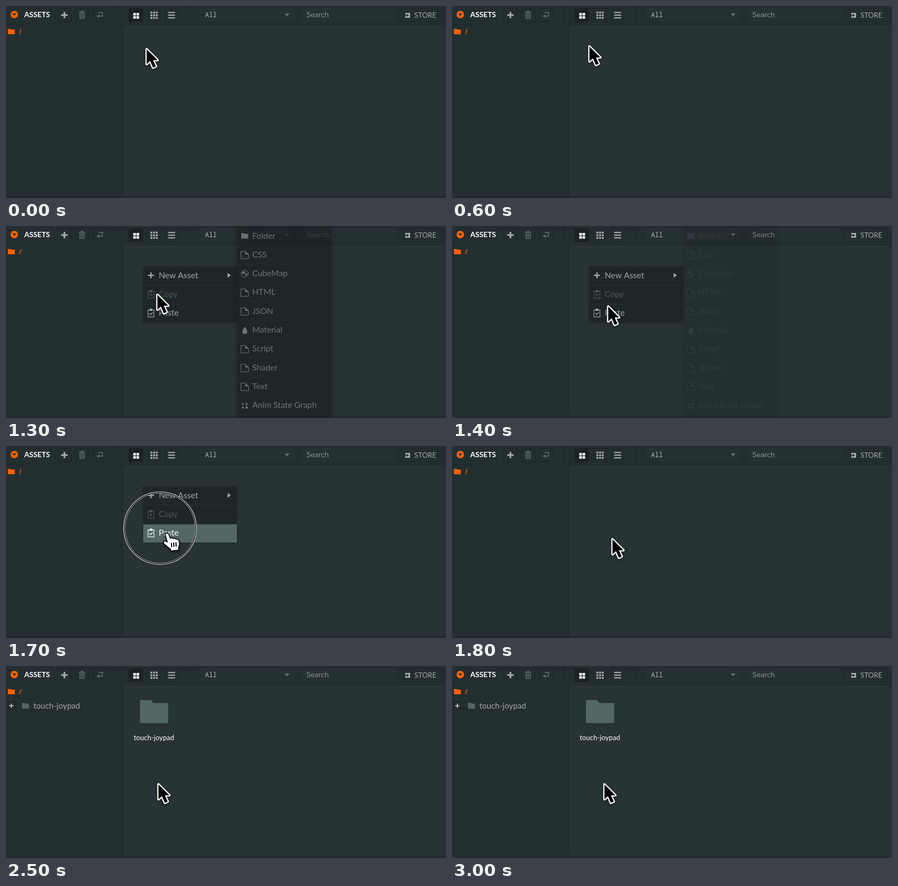
Animation of 821x360 px, one loop 3.2 s. Source, as an HTML page with a canvas:

```html
<!DOCTYPE html>
<html lang="en">
<head>
<meta charset="utf-8">
<title>Assets panel</title>
<style>
html, body { margin: 0; width: 100%; height: 100%; overflow: hidden; background: #283335; }
canvas { display: block; width: 821px; height: 360px; }
</style>
</head>
<body>
<canvas id="stage"></canvas>
<script>
const W = 821, H = 360, LOOP = 3200, STEP = 100;
const canvas = document.getElementById('stage');
const ctx = canvas.getContext('2d');
const dpr = window.devicePixelRatio || 1;
canvas.width = W * dpr;
canvas.height = H * dpr;

const SANS = 'Lato, "Open Sans", sans-serif';
const MONO = '"Noto Sans Mono", "DejaVu Sans Mono", monospace';
const ORANGE = '#ff6000', GREY = '#a0a8aa', DIM = '#4d5759', SLATE = '#546666';
const BACK = '#283335', BAR = '#232e30', MENU = '#1f2628', EDGE = '#20292b';
const MENU_SIZE = 15.5;

function rect(x, y, w, h, color) {
  ctx.fillStyle = color;
  ctx.fillRect(x, y, w, h);
}

function frame(x, y, w, h, color) {
  ctx.strokeStyle = color;
  ctx.lineWidth = 1;
  ctx.strokeRect(x + 0.5, y + 0.5, w - 1, h - 1);
}

function text(str, x, y, size, color, font = SANS, weight = 400, align = 'left') {
  ctx.font = `${weight} ${size}px ${font}`;
  ctx.textAlign = align;
  ctx.fillStyle = color;
  ctx.fillText(str, x, y);
}

function trace(points) {
  ctx.beginPath();
  points.forEach(([x, y], i) => i ? ctx.lineTo(x, y) : ctx.moveTo(x, y));
}

function poly(points, color) {
  trace(points);
  ctx.closePath();
  ctx.fillStyle = color;
  ctx.fill();
}

function line(points, color, width = 1) {
  trace(points);
  ctx.strokeStyle = color;
  ctx.lineWidth = width;
  ctx.stroke();
}

function disc(x, y, r, color) {
  ctx.beginPath();
  ctx.arc(x, y, r, 0, Math.PI * 2);
  ctx.fillStyle = color;
  ctx.fill();
}

function ring(x, y, r, color, width) {
  ctx.beginPath();
  ctx.arc(x, y, r, 0, Math.PI * 2);
  ctx.strokeStyle = color;
  ctx.lineWidth = width;
  ctx.stroke();
}

function plus(x, y, size, color, width) {
  rect(x - size / 2, y - width / 2, size, width, color);
  rect(x - width / 2, y - size / 2, width, size, color);
}

function folder(x, y, w, h, color) {
  const lip = h * 0.13;
  poly([[x, y], [x + w * 0.39, y], [x + w * 0.48, y + lip],
    [x + w, y + lip], [x + w, y + h], [x, y + h]], color);
}

function button(x, w, active) {
  rect(x, 4, w, 26, active ? '#1b2224' : BAR);
  frame(x, 4, w, 26, active ? '#1b2224' : '#1d2628');
}

function drawHeader() {
  rect(0, 0, W, 35, BAR);
  rect(0, 35, W, 1, EDGE);
  rect(208, 0, 2, 35, EDGE);
  rect(342, 0, 2, 35, EDGE);

  disc(15.5, 16, 7, ORANGE);
  poly([[12, 14], [19, 14], [15.5, 18.5]], BAR);
  text('ASSETS', 34, 21, 13.7, '#fff', SANS, 700);

  [96, 129, 162].forEach(x => button(x, 26));
  plus(109, 17, 12, '#a7afb0', 3);

  const off = '#566163';
  rect(136, 11, 12, 2, off);
  rect(140, 9, 4, 2, off);
  rect(137, 14, 10, 10, off);
  [139, 141.5, 144].forEach(x => rect(x, 15, 1, 8, BAR));
  line([[173, 12], [180, 12], [180, 19], [172, 19]], off, 2);
  poly([[169, 19], [174, 15], [174, 23]], off);

  button(229, 27, true);
  button(263, 26);
  button(296, 26);
  for (let i = 0; i < 4; i++)
    rect(237.5 + (i % 2) * 6, 13 + (i >> 1) * 6, 4.8, 4.8, '#fff');
  for (let i = 0; i < 9; i++)
    rect(269.5 + (i % 3) * 5, 10.5 + Math.floor(i / 3) * 5, 3.5, 3.5, GREY);
  for (let i = 0; i < 3; i++) rect(302.5, 11 + i * 5, 13, 2.3, GREY);

  rect(362, 4, 176, 25, '#263133');
  text('All', 371.5, 21, 12, '#b1b8ba', MONO);
  poly([[520, 14], [529, 14], [524.5, 19.5]], '#626d6f');
  rect(552, 4, 173, 25, '#263133');
  text('Search', 560.5, 21, 14.3, '#899293');

  button(733, 80);
  rect(745, 13, 9, 9, '#a7afb0');
  line([[743, 17.5], [749, 17.5]], BAR, 2);
  poly([[748, 14.5], [752, 17.5], [748, 20.5]], BAR);
  text('STORE', 762, 22, 13.2, GREY);
}

function drawPanel(loaded) {
  rect(0, 0, W, H, BACK);
  rect(0, 36, 218, H, BAR);
  rect(218, 36, 1, H, EDGE);
  rect(813, 36, 8, H, '#263133');
  rect(0, 356, W, 4, '#222b2d');
  drawHeader();
  folder(3.5, 43, 13, 10, ORANGE);
  line([[25, 53], [28.5, 43]], ORANGE, 1.3);
  if (!loaded) return;

  line([[9.5, 55], [9.5, 66]], '#344042');
  line([[18, 74.5], [29, 74.5]], '#344042');
  rect(1, 66, 18, 17, '#20292b');
  plus(10, 74.5, 8, '#b1b8ba', 2);
  folder(30, 69, 13, 11, SLATE);
  text('touch-joypad', 51, 80, 15, GREY);
  folder(250, 64, 52.5, 43, SLATE);
  text('touch-joypad', 276, 138.5, 13, '#fff', SANS, 400, 'center');
}

function clipboard(y, color, done) {
  ctx.strokeStyle = color;
  ctx.lineWidth = 1.2;
  ctx.strokeRect(265, y - 5.5, 11, 13);
  rect(268, y - 8, 5, 4, color);
  if (done) line([[267.5, y + 1], [269.8, y + 3.3], [273.7, y - 1]], color, 1.4);
  else plus(270.5, y + 1, 6, color, 1.2);
}

function shadowBox(x, y, w, h, blur) {
  ctx.save();
  ctx.shadowColor = 'rgba(0,0,0,.4)';
  ctx.shadowBlur = blur * dpr;
  rect(x, y, w, h, MENU);
  ctx.restore();
}

function drawMenu(hover) {
  shadowBox(256, 76, 175, 105, 3);
  rect(256, 110, 175, 1, '#273032');
  rect(256, 146, 175, 1, '#273032');
  if (hover === 0) rect(256, 76, 175, 34, SLATE);
  if (hover === 2) rect(256, 147, 175, 34, SLATE);
  const top = hover === 0 ? '#fff' : GREY, paste = hover === 2 ? '#fff' : GREY;
  plus(270.5, 92.5, 11, top, 2.4);
  text('New Asset', 285, 97.5, MENU_SIZE, top);
  poly([[413.5, 88], [419.5, 92.5], [413.5, 97]], top);
  clipboard(128, DIM);
  text('Copy', 285, 133, MENU_SIZE, DIM);
  clipboard(163, paste, true);
  text('Paste', 285, 168, MENU_SIZE, paste);
}

const icons = {
  page(y) {
    line([[447, y - 6.5], [438.5, y - 6.5], [438.5, y + 7.5], [452.5, y + 7.5], [452.5, y - 1]], GREY);
    poly([[446.5, y - 7], [453, y - 0.5], [446.5, y - 0.5]], GREY);
  },
  folder(y) { folder(439, y - 5, 13, 10, GREY); },
  globe(y) {
    ring(445.5, y + 0.5, 6.6, GREY, 1);
    poly([[441, y - 3], [445, y - 5], [446, y - 1], [443, y + 1], [440, y]], GREY);
    poly([[447, y], [450.5, y - 1], [449, y + 4], [446, y + 4]], GREY);
  },
  drop(y) {
    ctx.beginPath();
    ctx.moveTo(445.5, y - 6.5);
    ctx.bezierCurveTo(448, y - 3, 450.2, y, 450.2, y + 2.8);
    ctx.arc(445.5, y + 2.8, 4.7, 0, Math.PI);
    ctx.bezierCurveTo(440.8, y, 443, y - 3, 445.5, y - 6.5);
    ctx.fillStyle = GREY;
    ctx.fill();
  },
  graph(y) {
    line([[440, y - 1], [442, y - 5], [444, y - 1], [440, y - 1]], GREY);
    line([[449, y - 6], [449, y - 1]], GREY, 1.2);
    poly([[446.5, y - 3], [451.5, y - 3], [449, y]], GREY);
    plus(442, y + 4, 5, GREY, 1.3);
    disc(449, y + 4, 2.4, GREY);
  }
};

const items = [
  ['Folder', 'folder'], ['CSS', 'page'], ['CubeMap', 'globe'], ['HTML', 'page'],
  ['JSON', 'page'], ['Material', 'drop'], ['Script', 'page'], ['Shader', 'page'],
  ['Text', 'page'], ['Anim State Graph', 'graph']
];

function drawSubmenu(alpha) {
  ctx.save();
  ctx.globalAlpha = alpha;
  shadowBox(431, -10, 176, H + 20, 8);
  items.forEach(([label, icon], i) => {
    const y = 18.5 + i * 35.33;
    rect(431, Math.round(y + 17), 176, 1, '#273032');
    icons[icon](y);
    text(label, 459.5, y + 5, MENU_SIZE, GREY);
  });
  ctx.restore();
}

function paintCursor(path, fill, stroke, width) {
  ctx.save();
  ctx.shadowColor = 'rgba(0,0,0,.45)';
  ctx.shadowBlur = 4 * dpr;
  ctx.shadowOffsetY = 2 * dpr;
  ctx.strokeStyle = stroke;
  ctx.lineWidth = width;
  ctx.lineJoin = 'round';
  ctx.stroke(path);
  ctx.restore();
  ctx.fillStyle = fill;
  ctx.fill(path);
}

const arrowPath = new Path2D('M1.5 4V32L8 26L13.4 38.6L18.8 36.2L13.4 24.4H21.8Z');
const handPath = new Path2D('M5.2 4.5C4 1 8.7-.2 10 3L13.3 11.5C14.5 9.3 18 9.7 18.7 12' +
  'C20 10 23.3 10.4 24 13C25.6 11.4 28.2 12.4 28.8 15C30.2 19.5 30.4 22 28.5 26L28.3 31.5' +
  'L15.2 33L14.5 29.8C10.5 27.5 7.5 24 3 20.5C.2 18 2.2 15 5 16L9.3 18.5Z');

function drawCursor(kind, x, y) {
  ctx.save();
  ctx.translate(x, y);
  if (kind === 'hand') {
    paintCursor(handPath, '#fff', '#000', 3.2);
    [[15.6, 18.5], [19.8, 18], [24, 17.5]].forEach(([a, b]) =>
      line([[a, b], [a + 0.6, b + 8]], '#000', 2));
  } else {
    paintCursor(arrowPath, '#000', '#fff', 4.6);
  }
  ctx.restore();
}

function drawRipple(r) {
  ring(287.5, 154, r - 1.2, '#101415', 3.4);
  ring(287.5, 154, r, '#e8ebeb', 1.1);
  ring(287.5, 154, r - 2.3, '#b9bfbf', 0.9);
}

// Each pose lasts from its time until the next one.
const poses = [
  { at: 0, cur: ['arrow', 261, 77] },
  { at: 600, cur: ['arrow', 255, 72] },
  { at: 700, cur: ['hand', 246, 77], hover: 0, sub: 0.5 },
  { at: 800, cur: ['hand', 246, 77], hover: 0, sub: 1 },
  { at: 1200, cur: ['hand', 259, 94], hover: 0, sub: 1 },
  { at: 1300, cur: ['arrow', 281, 125], hover: 1, sub: 0.6 },
  { at: 1400, cur: ['arrow', 290, 147], hover: 1, sub: 0.12 },
  { at: 1500, cur: ['hand', 288, 158], hover: 2 },
  { at: 1600, cur: ['hand', 292, 162], hover: 2, ripple: 34 },
  { at: 1700, cur: ['hand', 293, 163], hover: 2, ripple: 68 },
  { at: 1800, cur: ['arrow', 298, 171] },
  { at: 1900, cur: ['arrow', 293, 193] },
  { at: 2000, cur: ['arrow', 286, 211] },
  { at: 2100, cur: ['arrow', 283, 218] }
];

function draw(now) {
  const t = Math.floor((now % LOOP) / STEP) * STEP;
  const pose = poses.filter(p => p.at <= t).pop();
  ctx.setTransform(dpr, 0, 0, dpr, 0, 0);
  drawPanel(t >= 2500);
  if (pose.hover !== undefined) drawMenu(pose.hover);
  if (pose.sub) drawSubmenu(pose.sub);
  if (pose.ripple) drawRipple(pose.ripple);
  drawCursor(...pose.cur);
}

const start = performance.now();
function tick() {
  draw(performance.now() - start);
  requestAnimationFrame(tick);
}
tick();
</script>
</body>
</html>
```
